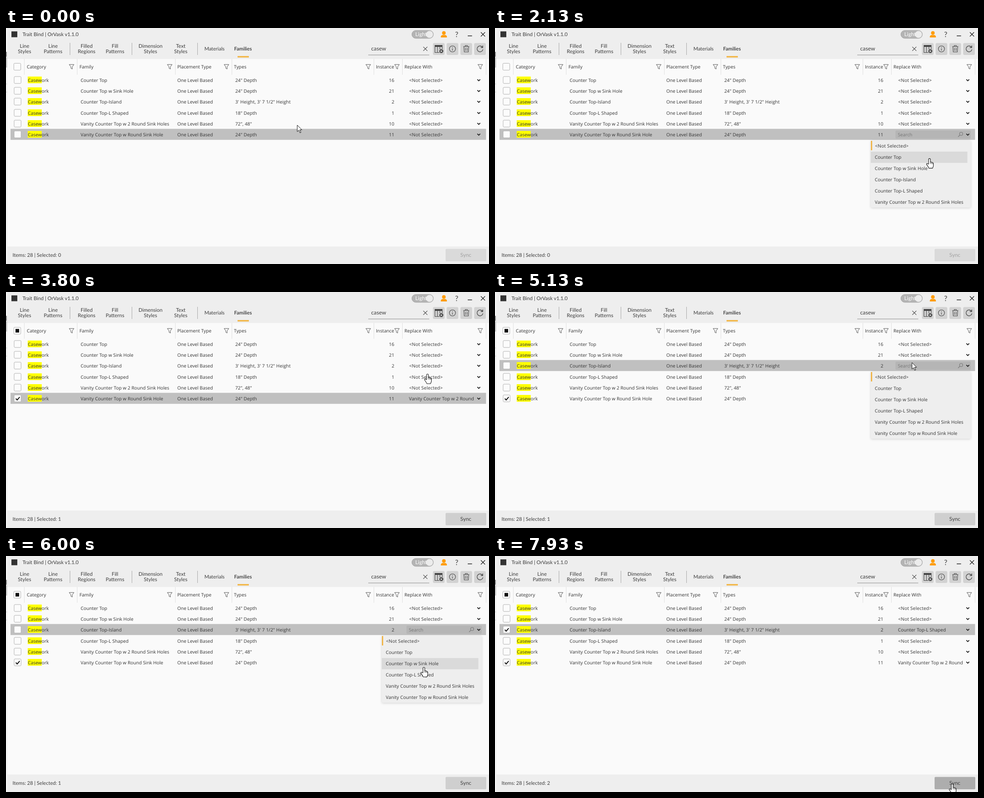
These frames come from a looping animation (1068x525 px, 8000 ms). An HTML page:

```html
<!DOCTYPE html>
<html lang="en">
<head>
<meta charset="utf-8">
<title>Family table</title>
<style>
html, body { margin: 0; width: 100%; height: 100%; overflow: hidden; background: #eee; }
svg { display: block; width: 1068px; height: 525px; text-rendering: geometricPrecision; }
text { font: 10.24px "Open Sans", "Noto Sans", sans-serif; fill: #333; }
.h { font: 11.3px Lato, sans-serif; fill: #3c3c3c; }
.mid { text-anchor: middle; }
.end { text-anchor: end; }
.line { fill: none; stroke: #444; stroke-width: 1.1; }
.menu { filter: drop-shadow(0 1px 2.5px rgba(0, 0, 0, .16)); }
</style>
</head>
<body>
<svg viewBox="0 0 1068 525" xmlns="http://www.w3.org/2000/svg">
  <g id="base"></g>
  <g id="live"></g>
</svg>
<script>
const FPS = 15, FRAMES = 120;
const NONE = '&lt;Not Selected&gt;';
const rows = [
  ['Counter Top', '24" Depth', 16],
  ['Counter Top w Sink Hole', '24" Depth', 21],
  ['Counter Top-Island', '3\' Height, 3\' 7 1/2" Height', 2],
  ['Counter Top-L Shaped', '18" Depth', 1],
  ['Vanity Counter Top w 2 Round Sink Holes', '72", 48"', 10],
  ['Vanity Counter Top w Round Sink Hole', '24" Depth', 11]
];
const rowY = i => Math.round(116 + i * 24.2);

const rect = (x, y, w, h, fill, more = '') =>
  `<rect x="${x}" y="${y}" width="${w}" height="${h}" fill="${fill}" ${more}/>`;
const text = (x, y, s, more = '') => `<text x="${x}" y="${y}" ${more}>${s}</text>`;
const path = (d, more = 'class="line"') => `<path d="${d}" ${more}/>`;
const at = (x, y, s) => `<g transform="translate(${x} ${y})">${s}</g>`;
const value = (x, y, s) => s === NONE ? text(x + .5, y, s, 'letter-spacing=".16"') : text(x, y, s);

function base() {
  let s = rect(0, 0, 1068, 525, '#eee') + rect(3, 69, 1065, 417, '#fafafa');
  // window behind, at the left edge
  s += rect(0, 0, 2.5, 525, '#f6f6f6') + rect(0, 53, 2, 11, '#8a8a8a') +
    rect(0, 65, 2.5, 23, '#c6c6c6') + rect(0, 124, 2.5, 1, '#ccc') + rect(0, 142, 2.5, 1, '#ccc');

  // title bar
  s += rect(12, 7.5, 13, 13, '#333');
  s += text(36.5, 18, 'Trait Bind | OrVask v1.1.0', 'class="h" style="font-size:11.2px"');
  s += rect(897.5, 5.5, 47.5, 17.5, '#b4b4b4', 'rx="8.7" stroke="#a4a4a4"');
  s += text(905, 18, 'Light', 'class="h" style="fill:#fff;font-size:11.8px"');
  s += '<circle cx="936.5" cy="14.2" r="7.7" fill="#ececec"/>';
  s += '<circle cx="968.2" cy="11" r="4" fill="#ff9d0a"/>';
  s += path('M961.5 21v-1.6q0-3.2 4-4h5.4q4 .8 4 4V21z', 'fill="#ff9d0a"');
  s += text(996.5, 19.5, '?', 'class="h mid" style="font-size:16px"');
  s += path('M1021 17.5h9.5M1050 9.5l9.3 9.3m0-9.3l-9.3 9.3', 'class="line" style="stroke:#222;stroke-width:1.3"');

  // tabs
  [[41, 'Line', 'Styles'], [104, 'Line', 'Patterns'], [178.3, 'Filled', 'Regions'], [241, 'Fill', 'Patterns'],
   [319.5, 'Dimension', 'Styles'], [386.5, 'Text', 'Styles']].forEach(([x, a, b]) => {
    s += text(x, 44, a, 'class="h mid"') + text(x, 56, b, 'class="h mid"');
  });
  s += text(461, 50, 'Materials', 'class="h mid" style="font-size:11px"');
  s += text(524, 50, 'Families', 'class="h mid" style="font-weight:600;font-size:11.1px;fill:#333"');
  for (const x of [141, 278, 423]) s += rect(x, 33, 1, 27, '#a8a8a8');
  s += rect(512, 62.5, 25, 3, '#f3b23a');

  // search field and tool buttons
  s += text(807.5, 50, 'casew', 'class="h" style="font-size:12.2px"') + rect(801, 59.5, 135, 1, '#8c8c8c');
  s += path('M922.7 41.8l9 9m0-9l-9 9');
  for (const x of [944, 974.3, 1004.8, 1035.2]) s += rect(x, 33.5, 25.8, 26.5, '#d2d2d2', 'rx="3"');
  s += path('M948.5 38.5h16v16h-16zM954 38.5v16M959.5 38.5v16') + rect(948, 38, 17, 4, '#444');
  s += '<circle cx="962.5" cy="51.5" r="5.2" fill="#d2d2d2"/>' +
    '<circle cx="962.5" cy="51.5" r="3.4" fill="none" stroke="#333" stroke-width="2.2" stroke-dasharray="1.8 .87"/>' +
    '<circle cx="962.5" cy="51.5" r="2.4" class="line"/>';
  s += '<circle cx="987.2" cy="46.5" r="6.8" class="line"/>' + path('M987.2 45.5v4.8M987.2 42.3v1.5');
  s += path('M1011.3 41.2h13M1015.5 41v-2h4.6v2M1012.5 41.5l.8 11.8h9l.8-11.8M1016 44.2v6.5M1019.6 44.2v6.5');
  s += path('M1053.8 43.2a6.5 6.5 0 1 0 .8 4.3M1054.2 39v4.5h-4.5', 'class="line" style="stroke-width:1.3"');

  // column heads
  [[46, 'Category', 145], [162.5, 'Family', 362], [378.7, 'Placement Type', 487.5], [504, 'Types', 801],
   [818, 'Instance', 864.5], [881, 'Replace With', 1048.7]].forEach(([x, name, f]) => {
    s += text(x, 90.2, name);
    s += at(f, 86, path('M-5.3-4.8H5.3L1.5.3V5.2L-1.5 3.6V.3Z', 'class="line" style="stroke:#555;stroke-width:1"'));
  });
  for (const x of [40, 157, 374, 499, 813, 876, 1061]) s += rect(x, 69, 1, 35, '#e0e0e0');
  return s;
}

const ease = k => k * k * (3 - 2 * k);
// [start, end, x, y of the goal, two optional control points]
const moves = [
  [0, 13, 900, 238, 760, 135, 1010, 300], [13, 17, 965, 237], [28, 38, 953, 390], [44, 57, 932, 183],
  [57, 64, 923, 164], [76, 77, 922, 157], [77, 85, 925, 279], [85, 88, 925, 256], [89, 90, 924, 248],
  [90, 93, 922, 262], [97, 110, 1008, 442], [110, 119, 1011, 507.5]
];

function pointer(n) {
  let x = 644, y = 216;
  for (const [a, b, gx, gy, ax = x, ay = y, bx = gx, by = gy] of moves) {
    if (n <= a) break;
    const k = Math.min(1, (n - a) / (b - a)), curved = ax !== x;
    const t = ease(k), u = 1 - t;
    const mix = (p, c, d, q) => curved
      ? u * u * u * p + 3 * u * u * t * c + 3 * u * t * t * d + t * t * t * q
      : p + (q - p) * t;
    const nx = mix(x, ax, bx, gx), ny = mix(y, ay, by, gy);
    x = nx;
    y = ny;
  }
  return { x, y };
}

const shapes = {
  arrow: path('M0 0V14.5L3.4 11.4 6 17.2 8.2 16.2 5.7 10.5H10.2Z', 'fill="#fff" stroke="#111" stroke-width="1"'),
  hand: path('M-2 12V1.5a2 2 0 0 1 4 0V7.5a1.7 1.6 0 0 1 2.6.6a1.6 1.6 0 0 1 2.4.8a1.5 1.6 0 0 1 1.6 1.6V15' +
    'c0 3-1.5 4-1.8 6H-1.5C-2 18-5 15-6.5 12.5c-.6-1.6 1.3-2.6 2.6-1.4z',
    'fill="#fff" stroke="#111" stroke-width="1.1" stroke-linejoin="round"') +
    path('M2 7.5v4M4.6 8.5v3.2M7 9.5v2.5', 'fill="none" stroke="#111" stroke-width=".8"'),
  beam: path('M-3.5-7.5H-1L0-6.7 1-7.5H3.5M0-6.7V6.7M-3.5 7.5H-1L0 6.7 1 7.5H3.5',
    'fill="none" stroke="#111" stroke-width="1.2"')
};

function cursorKind(p, open, c) {
  if (open) {
    if (p.y >= c + 13) return 'hand';
    return Math.abs(p.y - c) < 5 ? 'beam' : 'arrow';
  }
  const inCombo = p.x > 885 && p.y > 104 && p.y < 249;
  return inCombo || overSync(p) ? 'hand' : 'arrow';
}
const overSync = p => p.x > 972 && p.y > 491.5;

function box(c, on) {
  return rect(18, c - 8, 15.3, 15.3, '#fcfcfc', 'rx="2" stroke="#b0b0b0"') +
    (on ? path(`M21.7 ${c}l3 3.2 5.6-6.6`, 'fill="none" stroke="#111" stroke-width="1.9"') : '');
}

function menu(own, c, p, show) {
  const names = [NONE, ...rows.map(r => r[0]).filter((_, i) => i !== own)];
  const hot = Math.floor((p.y - c - 13) / 25);
  let s = rect(831, c + 13, 221, 149.5, '#eee', 'rx="3" class="menu"');
  if (hot >= 0) s += rect(831, c + 13 + hot * 25, 213.5, 25, '#dadada');
  s += rect(831.3, c + 14, 2.7, 21, '#f0b13c');
  names.forEach((name, i) => { s += value(839.8, c + 29 + i * 25, name); });
  return `<g opacity="${show}">${s}</g>`;
}

function live(n) {
  const p = pointer(n);
  const first = n >= 45, second = n >= 98;
  const picked = n >= 65 ? 2 : 5, c = rowY(picked);
  const start = n >= 65 ? 65 : 20;
  const open = (n >= 20 && !first) || (n >= 65 && !second);

  let s = rect(17.3, 78.5, 15.3, 15.3, '#fcfcfc', 'rx="2" stroke="#b0b0b0"');
  if (first) s += rect(21, 82.2, 8, 8, '#111');

  s += rect(10, c - 12.7, 1051.5, 24.5, '#c0c0c0');
  rows.forEach(([name, types, count], i) => {
    const y = rowY(i), b = y + 3.8;
    s += box(y, (i === 5 && first) || (i === 2 && second));
    s += rect(48, y - 8, 31, 15, '#ffff00') + text(48.3, b, 'Casework') + text(165, b, name);
    s += text(378.7, b, 'One Level Based') + text(507, b, types, i === 2 ? 'letter-spacing=".08"' : '');
    s += text(858.5, b, count, 'class="end"');
    if (open && i === picked) {
      s += rect(885.5, y - 9, 166.5, 18, '#b5b5b5', 'rx="2"') + text(890.7, b, 'Search', 'style="fill:#777"');
      s += `<circle cx="1030.7" cy="${y - 1.5}" r="3.5" class="line" style="stroke:#777"/>` +
        path(`M1028.2 ${y + 1}l-4.2 4`, 'class="line" style="stroke:#777"');
    } else {
      const chosen = i === 5 && first ? 'Vanity Counter Top w 2 Round' : i === 2 && second ? rows[3][0] : NONE;
      s += value(891, b, chosen);
    }
    s += path(`M1042.2 ${y - 1.6}l3.2 3 3.2-3`, 'fill="none" stroke="#222" stroke-width="1.9"');
  });

  s += text(14.5, 509.3, `Items: 28 | Selected: ${first + second}`, 'class="h" style="font-size:11.1px"');
  const fill = !first ? '#dadada' : overSync(p) ? '#adadad' : '#cfcfcf';
  s += rect(972, 491.5, 90, 27.5, fill, 'rx="2"');
  s += text(1016.8, 509.3, 'Sync', `class="h mid" style="font-size:11.8px;fill:${first ? '#444' : '#a2a2a2'}"`);

  if (open) s += menu(picked, c, p, Math.min(1, (n - start + 1) / 3));
  return s + at(p.x, p.y, shapes[cursorKind(p, open, c)]);
}

const liveGroup = document.getElementById('live');
document.getElementById('base').innerHTML = base();
let shown = -1;

function update(now) {
  const n = Math.floor((now % 8000 + 4) * FPS / 1000) % FRAMES;
  if (n !== shown) liveGroup.innerHTML = live(shown = n);
}

let origin = null;
function tick(now) {
  if (origin === null) origin = now;
  update(now - origin);
  requestAnimationFrame(tick);
}
update(0);
requestAnimationFrame(tick);
</script>
</body>
</html>
```
